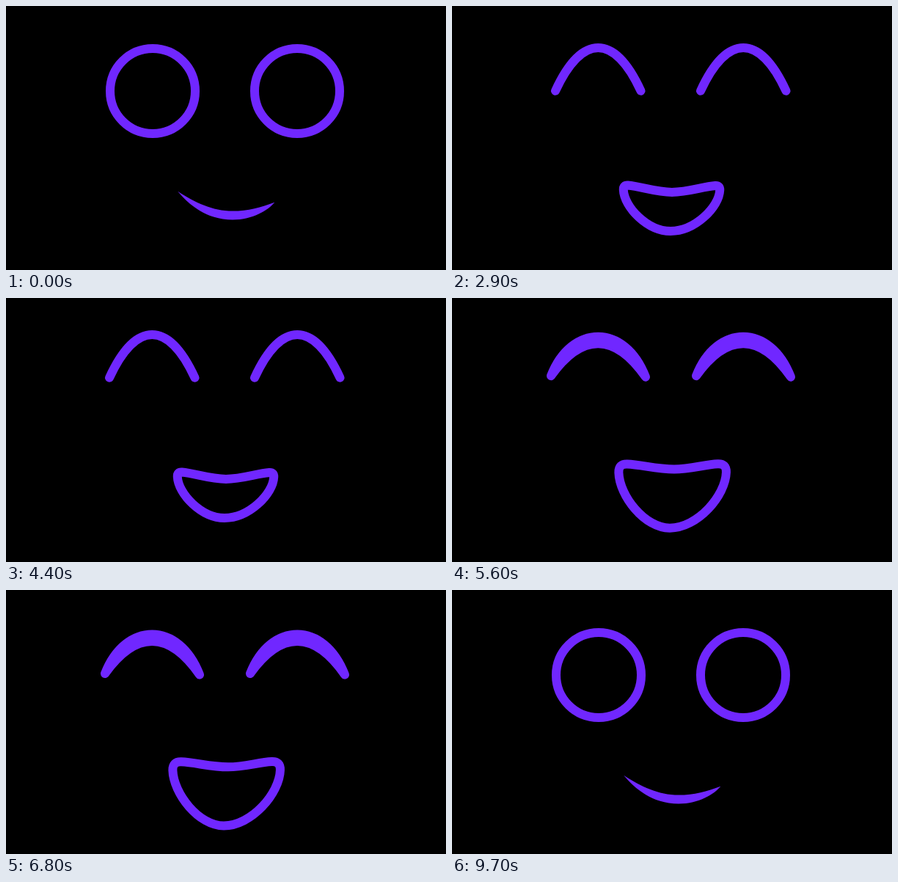
Write an HTML page with a canvas that moves like this. It is 600 px wide and 360 px high and loops after 10000 ms.

```html
<!DOCTYPE html>
<html lang="en">
<head>
<meta charset="utf-8">
<title>Happy face</title>
<style>
  html, body { margin: 0; width: 100%; height: 100%; overflow: hidden; background: #000; }
  canvas { display: block; }
</style>
</head>
<body>
<canvas id="stage" width="600" height="360"></canvas>
<script>
const ctx = document.getElementById('stage').getContext('2d');
const COLOR = '#7027ff';
const LINE = 12;
const LOOP = 10000;
const STEP = 100;
const RAISED = -7.5;

// left, right: corners; top, bottom: middle of each lip; round: corner size;
// sag: how steeply the upper lip leaves the corners; lean: how far the lower lip leans in.
const smirk = { left: [234, 252.5], right: [366.5, 267.5], top: [309, 279.5], bottom: [309, 291.5], round: 1, sag: 1.8, lean: 0.85 };
const grin = { left: [234.5, 252.5], right: [361.5, 259], top: [300, 285.5], bottom: [298, 310.5], round: 2.5, sag: 1.65, lean: 0.28 };
const open = { left: [233.5, 244], right: [365.5, 244.5], top: [300, 254], bottom: [298, 307], round: 6.5, sag: 0.6, lean: 0.04 };
const laugh = { left: [227, 229.8], right: [374.3, 229.5], top: [303, 237.3], bottom: [297, 317.5], round: 12, sag: 0.45, lean: 0.03 };

const lerp = (a, b, p) => Array.isArray(a) ? a.map((v, i) => lerp(v, b[i], p)) : a + (b - a) * p;
const mix = (a, b, p) => Object.fromEntries(Object.keys(a).map(k => [k, lerp(a[k], b[k], p)]));
const span = (t, from, to) => Math.min(1, Math.max(0, (t - from) / (to - from)));
const ease = (p, n) => p < 0.5 ? Math.pow(2 * p, n) / 2 : 1 - Math.pow(2 - 2 * p, n) / 2;

const closed = mix(open, grin, 1.75);

// Half of a mouth: lip middle, corner, lower lip middle.
function side([x, y], { top, bottom, round, sag, lean }) {
  const dir = Math.sign(top[0] - x);
  const slope = sag * (top[1] - y) / Math.abs(top[0] - x);
  const upper = d => [x + dir * d, y + slope * d];
  const lower = d => [x + dir * lean * d, y + d];
  const [ux] = upper(round), [, ly] = lower(round);
  return {
    upStart: upper(round),
    upHandle: upper(round + 0.3 * Math.abs(top[0] - ux)),
    topHandle: [top[0] - dir * 0.37 * Math.abs(top[0] - ux), top[1]],
    lowStart: lower(round),
    lowHandle: lower(round + 0.42 * (bottom[1] - ly)),
    bottomHandle: [bottom[0] - dir * 0.49 * Math.abs(bottom[0] - x), bottom[1]]
  };
}

function mouth(m, { y = 0, line = LINE, fill = false } = {}) {
  const l = side(m.left, m), r = side(m.right, m);
  ctx.save();
  ctx.translate(0, y);
  ctx.beginPath();
  ctx.moveTo(...l.upStart);
  ctx.bezierCurveTo(...l.upHandle, ...l.topHandle, ...m.top);
  ctx.bezierCurveTo(...r.topHandle, ...r.upHandle, ...r.upStart);
  ctx.quadraticCurveTo(...m.right, ...r.lowStart);
  ctx.bezierCurveTo(...r.lowHandle, ...r.bottomHandle, ...m.bottom);
  ctx.bezierCurveTo(...l.bottomHandle, ...l.lowHandle, ...l.lowStart);
  ctx.quadraticCurveTo(...m.left, ...l.upStart);
  paint(line, fill);
  ctx.restore();
}

function paint(line, fill) {
  if (fill) ctx.fill();
  ctx.lineWidth = line;
  if (line > 0) ctx.stroke();
}

// Arch from (x1, y1) to (x2, y2) whose crown reaches height peak.
function arch(x1, y1, x2, y2, peak, inset) {
  const h = (peak - (y1 + y2) / 8) / 0.75;
  const dir = Math.sign(x2 - x1);
  ctx.lineTo(x1, y1);
  ctx.bezierCurveTo(x1 + dir * inset, h, x2 - dir * inset, h, x2, y2);
}

function arcEye() {
  arch(141, 115.7, 257.5, 115.7, 57, 36);
  paint(LINE, false);
}

function crescentEye() {
  arch(135, 110, 264, 111.5, 56.5, 28);
  arch(264, 111.5, 135, 110, 66, 42);
  paint(LINE, true);
}

function ringEye() {
  ctx.arc(200, 116, 58, 0, Math.PI * 2);
  paint(LINE, false);
}

function eyes(shape, y = 0, gap = 198) {
  for (const x of [0, gap]) {
    ctx.save();
    ctx.translate(x, y);
    ctx.beginPath();
    shape();
    ctx.restore();
  }
}

const lift = t => RAISED * ease(span(t, 3800, 4600), 3);
const sink = t => lerp(-4, 4, ease(span(t, 5500, 6500), 2));
const hop = t => -4.6 * Math.sin(Math.PI * span(t, 2600, 2900));

function drawEyes(t) {
  if (t < 700 || t >= 8800) eyes(ringEye, 0, 197);
  else if (t < 4800) eyes(arcEye, lift(t) + hop(t));
  else if (t < 7400) eyes(crescentEye, sink(t));
  else eyes(arcEye, RAISED);
}

function drawMouth(t) {
  if (t < 1900) {
    const p = span(t, 600, 1000);
    mouth(mix(smirk, closed, p), { line: LINE * p, fill: true });
  } else if (t < 2000) {
    mouth(grin);
  } else if (t < 4800) {
    mouth(open, { y: lift(t) });
  } else if (t < 7400) {
    mouth(laugh, { y: sink(t) });
  } else {
    const p = span(t, 7300, 7500);
    mouth(mix(laugh, smirk, p), { y: 4 * (1 - p), line: LINE * (1 - p), fill: p === 1 });
  }
}

function render(now) {
  const t = Math.floor((now % LOOP) / STEP) * STEP;
  ctx.fillStyle = '#000';
  ctx.fillRect(0, 0, 600, 360);
  ctx.fillStyle = ctx.strokeStyle = COLOR;
  ctx.lineCap = ctx.lineJoin = 'round';
  drawEyes(t);
  drawMouth(t);
}

let start = null;
function tick(now) {
  if (start === null) start = now;
  render(now - start);
  requestAnimationFrame(tick);
}
render(0);
requestAnimationFrame(tick);
</script>
</body>
</html>
```
